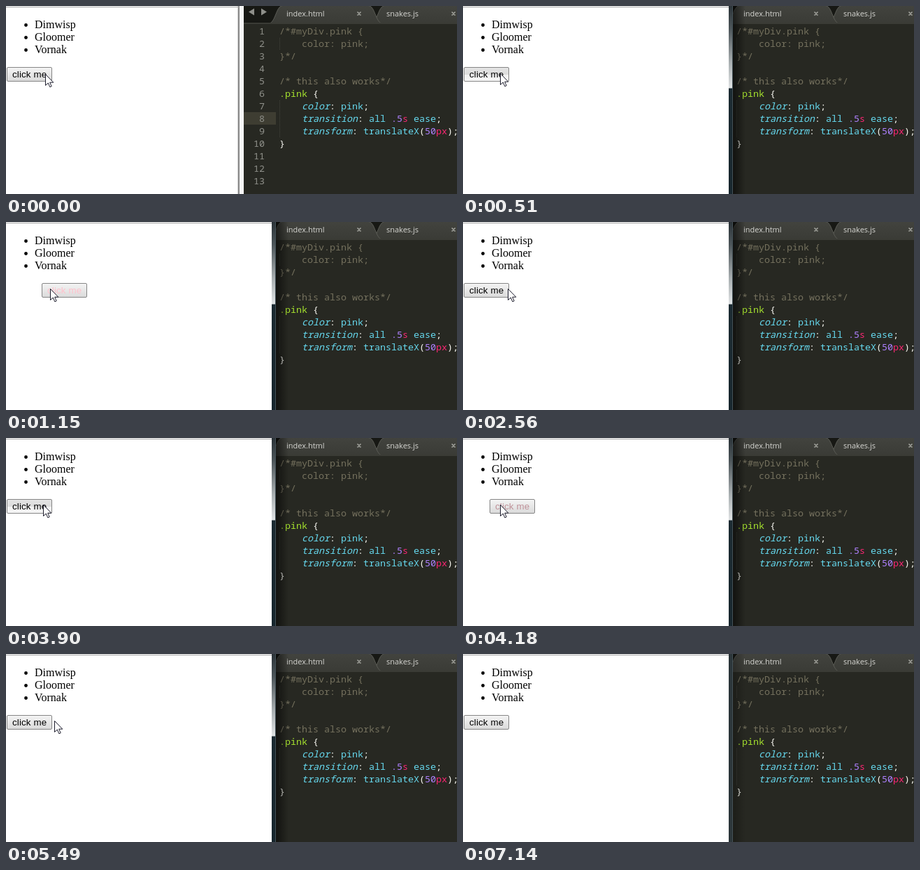
These frames come from a looping animation (645x271 px, 7170 ms). An HTML page:

```html
<!DOCTYPE html>
<html lang="en">
<head>
<meta charset="utf-8">
<title>Button transition demo</title>
<style>
  html, body { margin: 0; width: 100%; height: 100%; overflow: hidden; background: #fff; }
  svg { display: block; width: 645px; height: 271px; }
  text { white-space: pre; }
  .list { font: 16px "Liberation Serif", serif; }
  .label { font: 13.333px "Liberation Sans", sans-serif; letter-spacing: .15px; }
  .tab { font: 11px "Open Sans", sans-serif; fill: #d6d6d2; }
  .code { font: 500 13.333px "Noto Sans Mono", monospace; }
  .num { fill: #8f908a; text-anchor: end; font-weight: 400; }
  .note { fill: #75715e; font-weight: 400; }
  .rule { fill: #a6e22e; }
  .prop { fill: #66d9ef; font-style: italic; }
  .word { fill: #66d9ef; }
  .value { fill: #ae81ff; }
  .unit { fill: #f92672; }
  .mark { fill: #f8f8f2; }
</style>
</head>
<body>
<svg viewBox="0 0 645 271">
  <defs>
    <linearGradient id="tabFill" x2="0" y2="1">
      <stop stop-color="#42433e"/><stop offset="1" stop-color="#3a3b36"/>
    </linearGradient>
    <linearGradient id="idle" x2="0" y2="1">
      <stop stop-color="#f4f4f4"/><stop offset="1" stop-color="#dadada"/>
    </linearGradient>
    <linearGradient id="pressed" x2="0" y2="1">
      <stop stop-color="#e4e4e4"/><stop offset=".5" stop-color="#dcdcdc"/>
      <stop offset=".5" stop-color="#f0f0f0"/><stop offset="1" stop-color="#f6f6f6"/>
    </linearGradient>
    <linearGradient id="shade">
      <stop stop-opacity=".55"/><stop offset="1" stop-opacity="0"/>
    </linearGradient>
    <linearGradient id="glass" x2="0" y2="1">
      <stop stop-color="#2b3338"/><stop offset=".12" stop-color="#4c5559"/>
      <stop offset=".3" stop-color="#a9afb1"/><stop offset=".435" stop-color="#dfe2e3"/>
      <stop offset=".44" stop-color="#1b2a31"/><stop offset="1" stop-color="#17262d"/>
    </linearGradient>
  </defs>

  <rect width="645" height="271" fill="#fff"/>

  <g id="editor">
    <rect x="339" width="306" height="271" fill="#272822"/>
    <rect x="339" width="306" height="26" fill="#171814"/>
    <path d="M347 8.500l8-5v10zM373 8.500l-8-5v10z" fill="#8e8f8a"/>
    <g fill="url(#tabFill)" stroke="#5b5c56">
      <path d="M522 25.500C532 23 532 -.5 542 -.5H646V25.500z"/>
      <path d="M376 25.500C386 23 386 -.5 396 -.5H518C528 -.5 528 23 538 25.500z"/>
    </g>
    <rect x="339" y="24" width="306" height="2" fill="#3a3b35"/>
    <text class="tab" x="401" y="15">index.html</text>
    <text class="tab" x="544" y="15">snakes.js</text>
    <path d="M502.500 8.500l5 5m0-5l-5 5M637.500 8.500l5 5m0-5l-5 5" stroke="#a5a6a0" stroke-width="1.500"/>
    <rect x="339" y="153" width="47" height="18" fill="#3e3d32"/>
    <path d="M391.500 46v17M391.500 136v53" stroke="#42433c" stroke-dasharray="1 1"/>
    <g id="code" class="code"></g>
  </g>

  <g id="narrow">
    <rect x="331" width="1" height="271" fill="#cfcfcf"/>
    <rect x="332" width="2" height="271" fill="#8a8a8a"/>
    <rect x="334" width="6" height="271" fill="#f6f6f6"/>
  </g>
  <g id="wide">
    <rect id="shadow" x="386" width="18" height="271" fill="url(#shade)"/>
    <rect width="380" height="271" fill="#fff"/>
    <rect id="frame" x="380" width="5" height="271"/>
    <rect x="385" width="1" height="271" fill="#455258"/>
  </g>
  <rect id="topLine" y="1" height="1" fill="#a3a3a3"/>

  <g id="list" class="list"></g>

  <g id="button">
    <rect id="face" x=".5" y="88.500" width="64" height="20" rx="1.500" stroke="#858585"/>
    <text id="label" class="label" x="8" y="103">click me</text>
  </g>

  <path id="cursor" d="M.5.5V16.500L4.300 13L6.800 18.800L9.200 17.800L6.700 12.200H11.800z" fill="#fff" stroke="#1c1c2c"/>
</svg>

<script>
const LOOP = 7170;
const $ = id => document.getElementById(id);

function add(parent, tag, attrs, text = "") {
  const el = document.createElementNS("http://www.w3.org/2000/svg", tag);
  for (const key in attrs) el.setAttribute(key, attrs[key]);
  el.textContent = text;
  parent.append(el);
  return el;
}

["Dimwisp", "Gloomer", "Vornak"].forEach((name, i) => {
  add($("list"), "circle", { cx: 28.5, cy: 27.5 + 18 * i, r: 2.4 });
  add($("list"), "text", { x: 41, y: 32 + 18 * i }, name);
});

// Each line: indent, then class and text pairs.
const lines = [
  [0, "note", "/*#myDiv.pink {"],
  [4, "note", "color: pink;"],
  [0, "note", "}*/"],
  [0],
  [0, "note", "/* this also works*/"],
  [0, "rule", ".pink", "mark", " {"],
  [4, "prop", "color", "mark", ": ", "word", "pink", "mark", ";"],
  [4, "prop", "transition", "mark", ": ", "word", "all ", "value", ".5", "unit", "s", "word", " ease", "mark", ";"],
  [4, "prop", "transform", "mark", ": ", "word", "translateX", "mark", "(", "value", "50", "unit", "px", "mark", ");"],
  [0, "mark", "}"],
  [0], [0], [0]
];
lines.forEach(([indent, ...parts], i) => {
  const y = 41 + 18 * i;
  add($("code"), "text", { class: "num", x: 370, y }, i + 1);
  const row = add($("code"), "text", { x: 391 + 8 * indent, y });
  for (let p = 0; p < parts.length; p += 2) add(row, "tspan", { class: parts[p] }, parts[p + 1]);
});

// Pointer path: time, x, y
const path = [
  [0, 56, 98], [250, 56, 98], [470, 53, 97], [970, 53, 97], [1150, 63, 96],
  [1330, 71, 96], [2520, 71, 96], [2560, 64, 96], [3150, 64, 96], [3230, 57, 96],
  [3410, 57, 96], [3440, 53, 96], [4650, 53, 96], [4840, 68, 96], [5460, 68, 96],
  [5490, 69, 96], [6130, 69, 96], [6330, 593, 196]
];
function pointer(t) {
  const i = path.findIndex(key => key[0] > t);
  if (i < 0) return null;
  const [a, b] = [path[i - 1], path[i]];
  const k = (t - a[0]) / (b[0] - a[0]);
  return [1, 2].map(n => Math.round(a[n] + (b[n] - a[n]) * k));
}

// CSS "ease": cubic-bezier(.25, .1, .25, 1)
function ease(x) {
  if (x <= 0) return 0;
  if (x >= 1) return 1;
  const curve = (u, p, q) => 3 * u * (1 - u) ** 2 * p + 3 * u * u * (1 - u) * q + u ** 3;
  let lo = 0, hi = 1;
  for (let i = 0; i < 20; i++) {
    const mid = (lo + hi) / 2;
    if (curve(mid, .25, .25) < x) lo = mid; else hi = mid;
  }
  return curve(lo, .1, 1);
}

const pinkSpans = [[505, 2010], [3955, 5490]];
const presses = [[440, 535], [1920, 2010], [3900, 3955], [5400, 5490]];
const within = t => ([from, to]) => t >= from && t < to;

function draw(t) {
  const front = t >= 250;
  const focused = t < 7140;
  $("wide").style.display = front ? "" : "none";
  $("narrow").style.display = front ? "none" : "";
  $("topLine").setAttribute("width", front ? 380 : 333);
  $("shadow").setAttribute("opacity", focused ? 1 : .5);
  $("frame").setAttribute("fill", focused ? "url(#glass)" : "#2b3539");

  const span = pinkSpans.find(within(t));
  const k = span ? ease((t - span[0]) / 500) : 0;
  $("button").setAttribute("transform", `translate(${1 + Math.round(50 * k)})`);
  $("label").setAttribute("fill", `rgb(${[255, 192, 203].map(c => Math.round(c * k))})`);
  $("face").setAttribute("fill", presses.some(within(t)) ? "url(#pressed)" : "url(#idle)");

  const spot = pointer(t);
  $("cursor").style.display = spot ? "" : "none";
  if (spot) $("cursor").setAttribute("transform", `translate(${spot})`);
}

let start;
function tick(now) {
  start ??= now;
  draw((now - start) % LOOP);
  requestAnimationFrame(tick);
}
draw(0);
requestAnimationFrame(tick);
</script>
</body>
</html>
```
